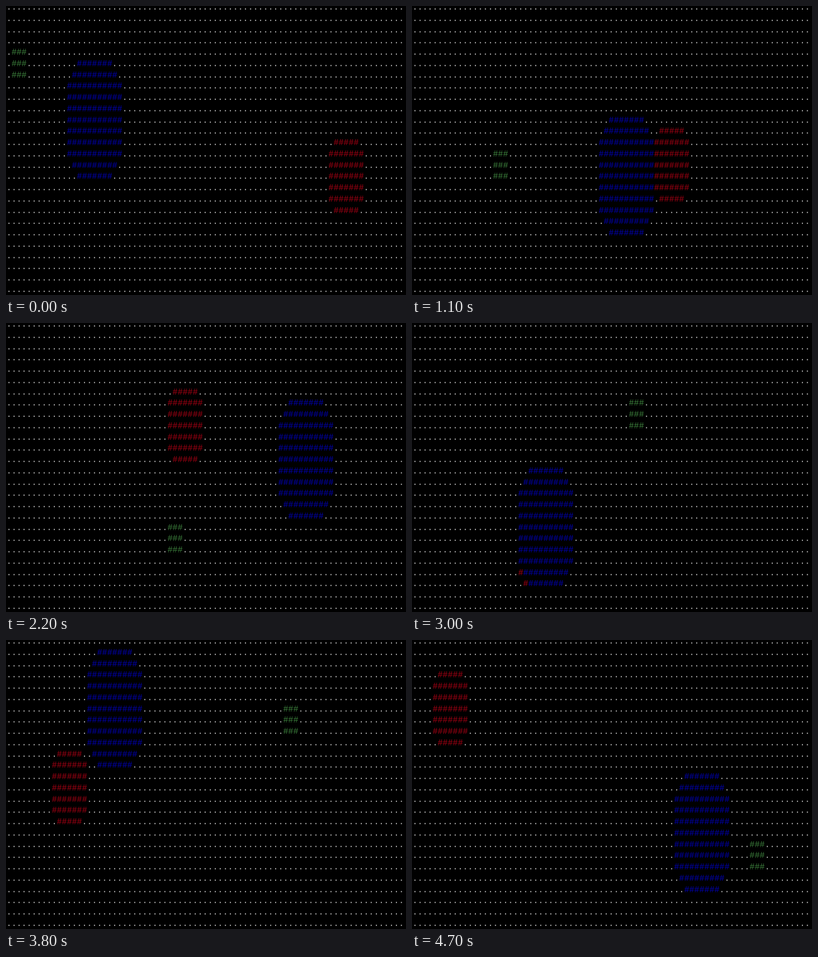
An HTML page with a canvas for the animation above (4.8 s loop, 663 px wide and 480 px high).

```html
<!DOCTYPE html>
<html lang="en">
<head>
<meta charset="utf-8">
<title>Bouncing balls</title>
<style>
  html, body { margin: 0; width: 100%; height: 100%; overflow: hidden; background: #000; }
  canvas { display: block; }
</style>
</head>
<body>
<canvas id="stage" width="663" height="480"></canvas>
<script>
const ctx = document.getElementById('stage').getContext('2d');
const COLS = 80, ROWS = 26, CELL_W = 8.34, CELL_H = 18.76;
const LOOP = 4800, HOLD = 100, STEP = 70;
const FONT = '13.9px "Liberation Mono", monospace';

// Later balls cover earlier ones.
const balls = [
  { r: 1, x: 2, y: 5, vx: -1, vy: -1, color: '#3c803c', weight: '' },
  { r: 3, x: 67, y: 15, vx: -1, vy: 1, color: '#80000f', weight: 'bold ' },
  { r: 5, x: 17, y: 10, vx: -3, vy: 1, color: '#00008c', weight: 'bold ' }
];
const dots = { color: '#b4b4b4', weight: '' };

// Fold an unbounded position back between two walls.
function bounce(p, lo, hi) {
  const span = hi - lo, period = 2 * span;
  const d = (((p - lo) % period) + period) % period;
  return lo + (d > span ? period - d : d);
}

function place(ball, n) {
  const lo = ball.r + 0.5;
  return {
    ball,
    x: bounce(ball.x + ball.vx * n, lo, COLS - lo),
    y: bounce(ball.y + ball.vy * n, lo, ROWS - lo)
  };
}

function covers({ ball, x, y }, col, row) {
  return (col - x) ** 2 + (row - y) ** 2 < (ball.r + 1) ** 2;
}

function draw(n) {
  const placed = balls.map(b => place(b, n)).reverse();
  ctx.fillStyle = '#000';
  ctx.fillRect(0, 0, 663, 480);
  ctx.textAlign = 'center';
  for (let row = 0; row < ROWS; row++) {
    for (let col = 0; col < COLS; col++) {
      const hit = placed.find(p => covers(p, col, row));
      const style = hit ? hit.ball : dots;
      ctx.font = style.weight + FONT;
      ctx.fillStyle = style.color;
      ctx.fillText(hit ? '#' : '.', 5 + col * CELL_W, 6 + row * CELL_H);
    }
  }
}

let last = -1;
function tick() {
  const slot = Math.floor((performance.now() % LOOP) / HOLD);
  if (slot !== last) {
    last = slot;
    draw(Math.floor((slot + 0.5) * HOLD / STEP));
  }
  requestAnimationFrame(tick);
}
tick();
</script>
</body>
</html>
```
